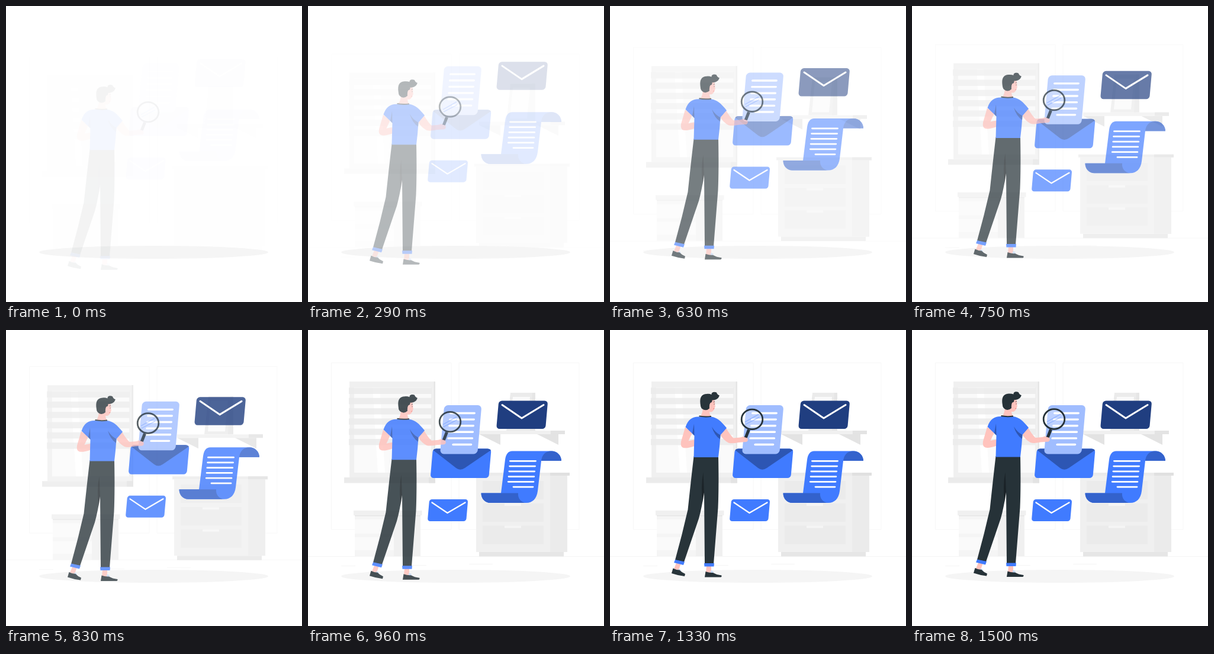
An HTML page for the animation above (1540 ms loop, 500 px wide and 500 px high).

```html
<!DOCTYPE html>
<html lang="en">
<head>
<meta charset="utf-8">
<title>Searching the mail</title>
<style>
  html, body { margin: 0; width: 100%; height: 100%; overflow: hidden; background: #fff; }
  svg { display: block; width: 100%; height: 100%; }
  .line { fill: none; stroke: #fff; stroke-linecap: round; stroke-linejoin: round; }
</style>
</head>
<body>
<svg viewBox="0 0 500 500">
  <g id="room">
    <path d="M0 382.5H500M56 398.500H80M168 397.500H200M272 395.500H312" stroke="#ebebeb" stroke-width=".5"/>
    <path d="M39.500 55.500H242V337H39.500ZM255 55.500H458V337H255Z" fill="none" stroke="#f7f7f7"/>

    <!-- window -->
    <path d="M70 87H215V249H70Z" fill="#f0f0f0"/>
    <path d="M212.500 87H215V249H212.500Z" fill="#e6e6e6"/>
    <path d="M78 97H208V241H78Z" fill="#fafafa"/>
    <path d="M109 97H121L130 241H118Z" fill="#fff"/>
    <g id="slats" fill="#ebebeb" fill-opacity=".85"></g>
    <path d="M61 249H215V258.500H61Z" fill="#ebebeb"/>
    <path d="M204 249H215V258.500H204Z" fill="#e3e3e3"/>

    <!-- low cabinet -->
    <path d="M79 313H190V382H79Z" fill="#f5f5f5"/>
    <path d="M145 313H190V382H145Z" fill="#f0f0f0"/>
    <path d="M79 320H145V344H79ZM79 350H145V372H79Z" fill="#fafafa"/>
    <path d="M77 305H192.500V313H77Z" fill="#f0f0f0"/>
    <path d="M79 313H190V314.500H79Z" fill="#e6e6e6"/>

    <!-- drawers -->
    <path d="M289 375H432V382.500H289Z" fill="#e6e6e6"/>
    <path d="M284 246H438V375H284Z" fill="#f0f0f0"/>
    <path d="M409 246H438V375H409Z" fill="#ebebeb"/>
    <path d="M295 255H398V286H295ZM295 293H398V324H295ZM295 330.500H398V361.500H295Z" fill="#ebebeb"/>
    <path d="M332 293H360V297H332ZM332 330.500H360V334.500H332Z" fill="#f5f5f5"/>
    <path d="M281 241H442V246H281Z" fill="#ebebeb"/>
    <path d="M409 241H442V246H409Z" fill="#e0e0e0"/>

    <!-- shelf -->
    <path d="M342 106H384V164L378 170H335Z" fill="#ebebeb"/>
    <path d="M346 113H375L370 165H341Z" fill="#fafafa"/>
    <path d="M379 106H384V170H375Z" fill="#e6e6e6"/>
    <path d="M289 176H325V194ZM387 176H423V194Z" fill="#e3e3e3"/>
    <path d="M289 170H434V176H289Z" fill="#f0f0f0"/>
    <path d="M410 170H434V176H410Z" fill="#e3e3e3"/>
  </g>

  <ellipse cx="249.500" cy="416" rx="193.500" ry="11" fill="#f5f5f5"/>

  <g id="mail" fill="#407bff">
    <g transform="skewX(-5)">
      <rect x="332.700" y="119.500" width="83" height="47.500" rx="5.500" fill="#203e80"/>
      <rect x="230.100" y="286" width="65.300" height="37" rx="4.500"/>
      <rect x="228.500" y="200.500" width="98.700" height="49.500" rx="5.500"/>
    </g>
    <path d="M328 126.500L361 149L398 126.500" class="line" stroke-width="3"/>
    <path d="M209.500 291.500L235.500 309L265.500 291.500" class="line" stroke-width="2.300"/>
    <path d="M211.500 203L250 233Q257 238.500 265 233L309 203Q307 200.500 303 200.500H217Q213 200.500 211.500 203Z" fill="#2d56b3"/>
    <g transform="skewX(-5)">
      <rect x="241.300" y="127" width="63.200" height="82.500" rx="6.500" fill="#a0bdff"/>
      <g id="letter" class="line" stroke-width="3.400"></g>
    </g>

    <!-- scroll -->
    <path d="M345 204.500H411C421 204.500 428 212 428 221H394L388 272C386.500 285 379 292 369 292H308C299 292 292.500 285 292.500 275.500H326L333 219Q335 204.500 345 204.500Z"/>
    <path d="M394 221C395 211 401 204.500 411 204.500S428 212 428 221ZM292.500 275.500H355C354 284 360 292 369 292H308C299 292 292.500 285 292.500 275.500Z" fill="#3362cc"/>
    <g id="note" class="line" stroke-width="2.800"></g>
  </g>

  <g id="person">
    <!-- legs -->
    <g fill="#ffc3bd">
      <path d="M112 393L119.500 395L116 405L108 403Z"/>
      <path d="M163 398H171V409H162Z"/>
    </g>
    <path d="M115.500 402.500L119 404L120 407.500L115 405.500ZM170 405.500L174.500 407L175 411L170 410Z" fill="#c9dbf5"/>
    <g fill="#263238">
      <path d="M106.500 402Q112 405 117.500 405Q121 409 127 411.500L126 415.500Q114 414 104 410.500Z"/>
      <path d="M161.500 407.500Q168 410 174 409.500Q180 413 188.500 414Q189 416.500 187 417H160Z"/>
      <path d="M141.500 213H183Q184 265 182.500 300L175 394.500H160L159 274Q155 300 150 318L125 391.500L110 388Q122 345 131.500 303Q136 260 141.500 213Z"/>
    </g>
    <path d="M157.500 240Q153 265 156.500 291L159 274Z" fill="#000" fill-opacity=".3"/>
    <path d="M110 387.500L126 391L124 396.500L108 392.500ZM159 393.500H176L175.500 399H159.500Z" fill="#407bff"/>

    <!-- arms and head -->
    <g fill="#ffc3bd">
      <path d="M127 164L139 173L132.500 187Q138 185.500 143 185V195.500Q130 200 124 198.500Q118.500 197 120 188Z"/>
      <path d="M186 176L196 165Q203 177 208.500 182L220 181L225 179.500L231.500 181.500Q234.500 187 230 188.500L217 189.500Q206 192 200 190Q191 185 186 176Z"/>
      <path d="M168 117L176 116Q178 122 177.300 126Q178.500 130 176.500 131Q176 136 171.500 138H168Q168 142 171 145.500H152Q157 141 157 128Z"/>
    </g>
    <path d="M174.500 121.500L177 120.500M176 124V125.500" stroke="#263238" stroke-width=".7"/>
    <path d="M174 133L176.500 132" stroke="#e8665f" stroke-width=".7"/>
    <path d="M152.800 126C151 114 154 108 163 107.500Q168 107 171.500 108.500C171 104.500 176 103.200 180 105.200Q181 109 184.800 110C184 114.500 180 117.500 174 118H172.500Q173 122 169.500 122.500Q167.500 125 168 132Q163 136.500 158 134.200Q153 132 152.800 126Z" fill="#263238"/>

    <!-- shirt -->
    <path d="M149 146H171C181 147.500 187 153 197 165L186.500 177Q185.500 195 183 214.500H141.500L142.500 178L139 174.500L127.500 163.500C132 150 139 146.500 149 146Z" fill="#407bff"/>
    <path d="M172 163Q178 173 186.500 177L186 184Q176 177 172 163ZM142 158L139 174L142.500 178Z" fill="#2d56b3"/>
    <path d="M150.500 145Q160 147 171 145.500" fill="none" stroke="#263238" stroke-width="2"/>

    <!-- magnifier -->
    <ellipse cx="240" cy="150.500" rx="17.500" ry="16.500" fill="#fff" fill-opacity=".3"/>
    <path d="M228 155L251 142M229 159L252 147" stroke="#6f9bff" stroke-opacity=".6" stroke-width="1.300"/>
    <path d="M234.500 168L229 182" stroke="#263238" stroke-width="5"/>
    <ellipse cx="240" cy="150.500" rx="17.800" ry="16.800" fill="none" stroke="#263238" stroke-width="2.800"/>
    <path d="M223.500 181.500L227 180.500L232 182Q233.500 187 230 188.500L223 188Z" fill="#ffc3bd"/>
  </g>
</svg>
<script>
  const $ = id => document.getElementById(id);
  const repeat = (count, make) => Array.from({ length: count }, (_, i) => make(i)).join('');

  $('slats').innerHTML = repeat(6, i => `<rect x="69" y="${97.5 + 17.3 * i}" width="140" height="10.500"/>`);
  $('letter').innerHTML = repeat(6, i =>
    `<path d="M${i < 5 ? 253 : 262} ${140.5 + 10.6 * i}H${i < 5 ? 293.5 : 292.5}"/>`);
  $('note').innerHTML = repeat(6, i =>
    `<path d="M${i < 5 ? 341.5 - i * .8 : 347} ${221.3 + 8.75 * i}H${384.5 - i * .9}"/>`);

  // Cubic easing from (0,0) to (1,1) with handles (x1,0) and (x2,1)
  function ease(x, x1, x2) {
    if (x >= 1) return 1;
    let low = 0, high = 1, s;
    for (let i = 0; i < 24; i++) {
      s = (low + high) / 2;
      const at = 3 * (1 - s) ** 2 * s * x1 + 3 * (1 - s) * s * s * x2 + s ** 3;
      if (at < x) low = s; else high = s;
    }
    return s * s * (3 - 2 * s);
  }

  function reveal(id, progress, from) {
    $(id).setAttribute('opacity', progress);
    $(id).setAttribute('transform', `translate(0 ${from * (1 - progress)})`);
  }

  const LOOP = 1540, LEAD = 40, start = performance.now();
  function draw() {
    const time = (performance.now() - start) % LOOP + LEAD;
    const easeIn = ease(time / 1000, .42, 1);
    reveal('room', easeIn, 30);
    reveal('mail', easeIn, -30);
    reveal('person', ease(time / 1500, 0, .58), 30);
    requestAnimationFrame(draw);
  }
  draw();
</script>
</body>
</html>
```
